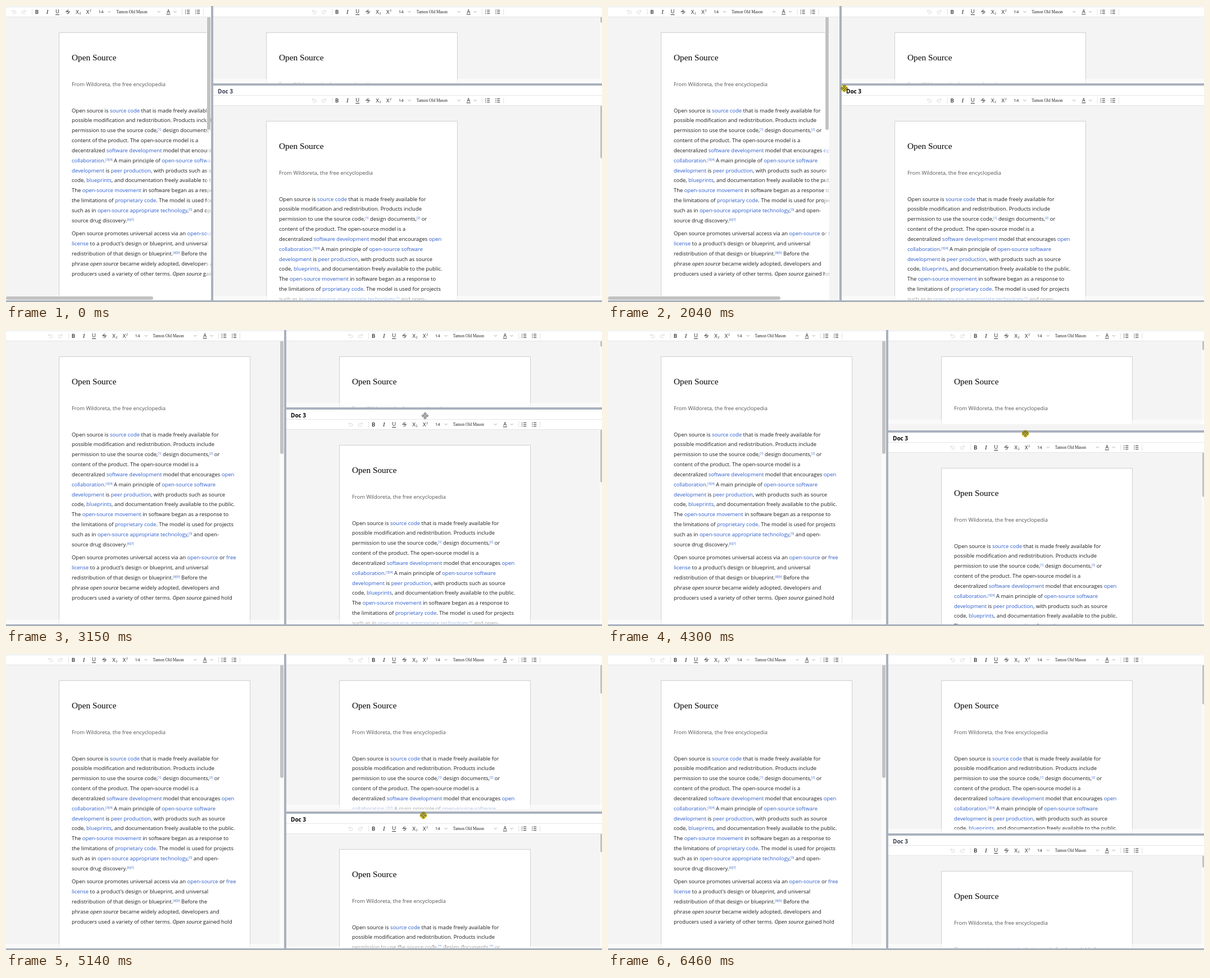
Animation, 1061 px wide and 528 px high, one loop 6790 ms. Source, as an HTML page:

```html
<!DOCTYPE html>
<html lang="en">
<head>
<meta charset="utf-8">
<title>Resizable document panes</title>
<style>
  html, body { margin: 0; width: 100%; height: 100%; overflow: hidden; background: #f4f4f4; }
  #stage { position: absolute; left: 0; top: 0; width: 1061px; height: 528px; overflow: hidden; }
  #stage div, #stage svg { position: absolute; }
  svg { display: block; left: 0; top: 0; overflow: visible; }
  .pane { overflow: hidden; background: #f4f4f4; }
  .view { left: 0; overflow: hidden; }
  .bar { left: 0; width: 100%; height: 19px; background: #fff linear-gradient(#e4e5e8 0 0) 0 1px / 100% 1px no-repeat; border-bottom: 1px solid #e4e5e8; overflow: hidden; }
  .head { left: 0; top: 0; width: 100%; height: 17px; background: #fff; }
  .head span { position: absolute; left: 8px; top: 3px; font: 700 10px/14px "Open Sans", sans-serif; white-space: nowrap; }
  .track { background: #fff9; right: 0; bottom: 0; }
  .track.v { top: 0; width: 8px; }
  .track.h { left: 0; height: 8px; }
  .thumb { background: #c2c2c2; border-radius: 3px; }
  .thumb.v { top: 19px; right: 1px; width: 6px; }
  .thumb.h { left: 0; bottom: 1px; height: 6px; }
  .split { background: #a9b1bd; }
  #col { top: 0; width: 4px; height: 528px; }
  #row { right: 0; height: 4px; }
  #base { left: 0; top: 525px; width: 1061px; height: 3px; }
  #press { mix-blend-mode: multiply; }

  .doc text { font: 9.45px "Open Sans", "Noto Sans", sans-serif; fill: #1c1c1c; white-space: pre; }
  .doc .title { font: 15.3px "Liberation Serif", serif; fill: #000; }
  .doc .sub { fill: #555; }
  .doc .link { fill: #2a5bcb; }
  .doc .ref { font-size: 5px; fill: #2a5bcb; baseline-shift: 3px; }
  .doc .term { font-style: italic; }
  .tools { font: 9.5px "Open Sans", sans-serif; fill: #222; }
  .tools path { fill: none; stroke: #333; }
  .tools .off path { stroke: #d8d8d8; }
  .tools .chevron { stroke: #9a9a9a; stroke-width: .9; }
  .tools .rule { stroke: #e2e2e2; }
</style>
</head>
<body>
<div id="stage"></div>
<script>
const LOOP = 6790, STEP = 70, LAG = 0.8;
const RIGHT = 1064.5, BOTTOM = 525, CONTENT_W = 486, CONTENT_H = 1270;
const stage = document.getElementById('stage');

const paragraphs = [
  [189.5, `Open source is {source code} that is made freely available for
possible modification and redistribution. Products include
permission to use the source code,[1] design documents,[2] or
content of the product. The open-source model is a
decentralized {software development} model that encourages {open}
{collaboration}.[3][4] A main principle of {open-source software}
{development} is {peer production}, with products such as source
code, {blueprints}, and documentation freely available to the public.
The {open-source movement} in software began as a response to
the limitations of {proprietary code}. The model is used for projects
such as in {open-source appropriate technology},[5] and open-
source drug discovery.[6][7]`],
  [409.2, `Open source promotes universal access via an {open-source} or {free}
{license} to a product's design or blueprint, and universal
redistribution of that design or blueprint.[8][9] Before the
phrase _open source_ became widely adopted, developers and
producers used a variety of other terms. _Open source_ gained hold`]
];

const span = cls => `<tspan class="${cls}">$1</tspan>`;
const rich = s => s
  .replace(/\{(.*?)\}/g, span('link'))
  .replace(/((?:\[\d\])+)/g, span('ref'))
  .replace(/_(.*?)_/g, span('term'));

const docSvg = `<svg class="doc" width="700" height="640">
  <rect x="94.5" y="47.5" width="340" height="580" fill="#fff" stroke="#cfcfcf"/>
  <text class="title" x="117" y="97">Open Source</text>
  <text class="sub" x="117" y="142.5">From Wildoreta, the free encyclopedia</text>
  ${paragraphs.map(([top, body]) => body.split('\n').map((line, i) =>
    `<text x="117" y="${top + i * 17.85}">${rich(line)}</text>`).join('')).join('')}
</svg>`;

const chevron = x => `<path class="chevron" d="M${x - 2.5} 9l2.5 2.5 2.5-2.5"/>`;
const rule = x => `<path class="rule" d="M${x}.5 5v11"/>`;
const undo = '<path d="M13 6.5l-2.5 2.5 2.5 2.5M10.5 9h5a2.3 2.3 0 0 1 0 4.6h-3.5"/>';
const toolsSvg = `<svg class="tools" width="365" height="19">
  <g class="off">${undo}<g transform="matrix(-1 0 0 1 46 0)">${undo}</g></g>
  <g text-anchor="middle">
    <text x="55" y="13.8" font-weight="600">B</text>
    <text x="73.5" y="13.8" font-style="italic" font-family="Liberation Serif, serif" font-size="11">I</text>
    <text x="91.5" y="13">U</text><text x="110" y="13.8">S</text>
    <text x="127" y="13.5">X</text><text x="132" y="15" font-size="5">2</text>
    <text x="145.5" y="13.5">X</text><text x="150.5" y="9.5" font-size="5">2</text>
    <text x="169" y="13" font-size="8">14</text>
    <text x="289" y="12.5" font-size="9">A</text>
  </g>
  <path d="M88 15.5h7M106 10.2h8M285.5 14.8h7"/>
  <text x="196.5" y="12.7" font-family="Liberation Serif, serif" font-size="7.4">Tamon Old Mason</text>
  ${[184, 272, 301].map(chevron).join('')}${[46, 313, 351].map(rule).join('')}
  <path d="M322 7.5h5M322 10.5h5M322 13.5h5M340 7.5h5M340 10.5h5M340 13.5h5"/>
  <path stroke-dasharray="1.6 1.4" d="M319.5 6.7v8M337.8 6.7v8"/>
</svg>`;

function makePane(offset) {
  const el = document.createElement('div');
  el.className = 'pane';
  el.innerHTML = `<div class="view" style="top:${offset}px">${docSvg}
      <div class="track v"></div><div class="track h" style="width:100%"></div>
      <div class="thumb v"></div><div class="thumb h"></div></div>
    ${offset ? '<div class="head"><span>Doc 3</span></div>' : ''}
    <div class="bar" style="top:${offset}px">${toolsSvg}</div>`;
  stage.append(el);
  const find = s => el.querySelector(s);
  return { el, view: find('.view'), tools: find('.tools'),
    vThumb: find('.thumb.v'), hThumb: find('.thumb.h') };
}

const leftPane = makePane(0), topPane = makePane(0), bottomPane = makePane(16);
// The heading overlaps the toolbar's blank first row.
bottomPane.el.append(bottomPane.el.querySelector('.head'));
stage.insertAdjacentHTML('beforeend', `
  <div id="row" class="split"></div><div id="col" class="split"></div><div id="base" class="split"></div>
  <svg width="1061" height="528" style="mix-blend-mode:normal"><g id="cursor">
    <path data-kind="arrow" d="M0 0v10l2.4-2.2 1.6 3.5 1.6-.7-1.6-3.4h3.3z" fill="#fff" stroke="#222" stroke-width=".9"/>
    <path data-kind="move" d="M0-6l2.2 2.4H.8V-.8h2.8v-1.4L6 0 3.6 2.2V.8H.8v2.8h1.4L0 6l-2.2-2.4h1.4V.8h-2.8v1.4L-6 0l2.4-2.2v1.4h2.8v-2.8h-1.4z" fill="#fff" stroke="#333" stroke-width=".8"/>
    <path data-kind="row" d="M0-6l2.4 2.6H.7v6.8h1.7L0 6l-2.4-2.6h1.7v-6.8h-1.7z" fill="#fff" stroke="#333" stroke-width=".8"/>
    <circle id="press" r="6.5" fill="#f5e23c" fill-opacity=".9"/>
  </g></svg>`);
const byId = id => document.getElementById(id);
const col = byId('col'), row = byId('row'), cursor = byId('cursor'), press = byId('press');
const title = bottomPane.el.querySelector('.head span');
const shapes = [...cursor.querySelectorAll('[data-kind]')];

// Keys are [time, values, ease-out power towards the next key].
const colKeys = [[0, [367]], [1890, [367], 2.25], [2670, [497]]];
const rowKeys = [[0, [140]], [4090, [140], 1.25], [4790, [254]], [5550, [318]], [5620, [322]]];
const cursorKeys = [
  [0, [977, 496]], [130, [977, 496], 1.5], [750, [407, 159]], [1090, [371, 136]], [1290, [371, 137]],
  [1760, [368, 141]], [1890, [374, 147], 2.25], [2670, [504, 147]], [2870, [504, 147], 1.8],
  [3150, [746, 153]], [3570, [772, 150]], [3899, [772, 150]], [3900, [742, 141]],
  [4090, [743, 144], 1.25], [4790, [743, 258]], [5550, [743, 323]], [5620, [743, 326]],
  [6180, [1006, 457]], [6460, [1034, 528]]
];
const kinds = [[0, 'arrow'], [1430, 'move'], [3900, 'row'], [4300, 'move'], [5480, 'row'], [5690, 'arrow']];

const current = (keys, t) => keys.findLastIndex(k => k[0] <= t);
function at(keys, t) {
  const i = current(keys, Math.max(0, t));
  const [start, from, power = 1] = keys[i], next = keys[i + 1];
  if (!next) return from;
  const elapsed = Math.floor((t - start) / STEP) * STEP;
  const u = 1 - (1 - Math.max(0, elapsed) / (next[0] - start)) ** power;
  return from.map((v, k) => v + (next[1][k] - v) * u);
}

// Position of a splitter, and the trailing position the views still use.
function splitter(keys, t) {
  const [now] = at(keys, t), [before] = at(keys, t - STEP);
  return [now, now + (before - now) * LAG].map(Math.round);
}

const px = (el, box) => { for (const k in box) el.style[k] = box[k] + 'px'; };

function layout(pane, x, y, w, h, viewW, viewH) {
  px(pane.el, { left: x, top: y, width: w, height: h });
  px(pane.view, { width: viewW, height: viewH });
  pane.tools.style.transform = `translateX(${(w - 365) / 2}px)`;
  px(pane.vThumb, { height: (viewH - 19) ** 2 / CONTENT_H });
  const trackW = viewW - 8;
  px(pane.hThumb, { width: trackW < CONTENT_W ? trackW ** 2 / CONTENT_W : 0 });
}

function draw(t) {
  const [x, oldX] = splitter(colKeys, t), [y, oldY] = splitter(rowKeys, t);
  const rightW = RIGHT - x - 2, oldW = RIGHT - oldX - 2;
  layout(leftPane, 0, 0, x - 2, BOTTOM, oldX - 2, BOTTOM);
  layout(topPane, x + 2, 0, rightW, y - 2, oldW, oldY - 2);
  layout(bottomPane, x + 2, y + 2, rightW, BOTTOM - y - 2, oldW, BOTTOM - oldY - 18);
  px(col, { left: x - 2 });
  px(row, { left: x, top: y - 2 });
  title.style.color = t >= 1960 && t < 6000 ? '#000' : '#3a3f52';

  const [cx, cy] = at(cursorKeys, t), kind = kinds[current(kinds, t)][1];
  cursor.setAttribute('transform', `translate(${cx} ${cy})`);
  cursor.style.display = t >= 130 && t < 6460 ? '' : 'none';
  press.style.display = (t >= 1890 && t < 2670) || (t >= 4090 && t < 5690) ? '' : 'none';
  for (const s of shapes) s.style.display = s.dataset.kind === kind ? '' : 'none';
}

const begin = performance.now();
function tick() {
  draw((performance.now() - begin) % LOOP);
  requestAnimationFrame(tick);
}
tick();
</script>
</body>
</html>
```
